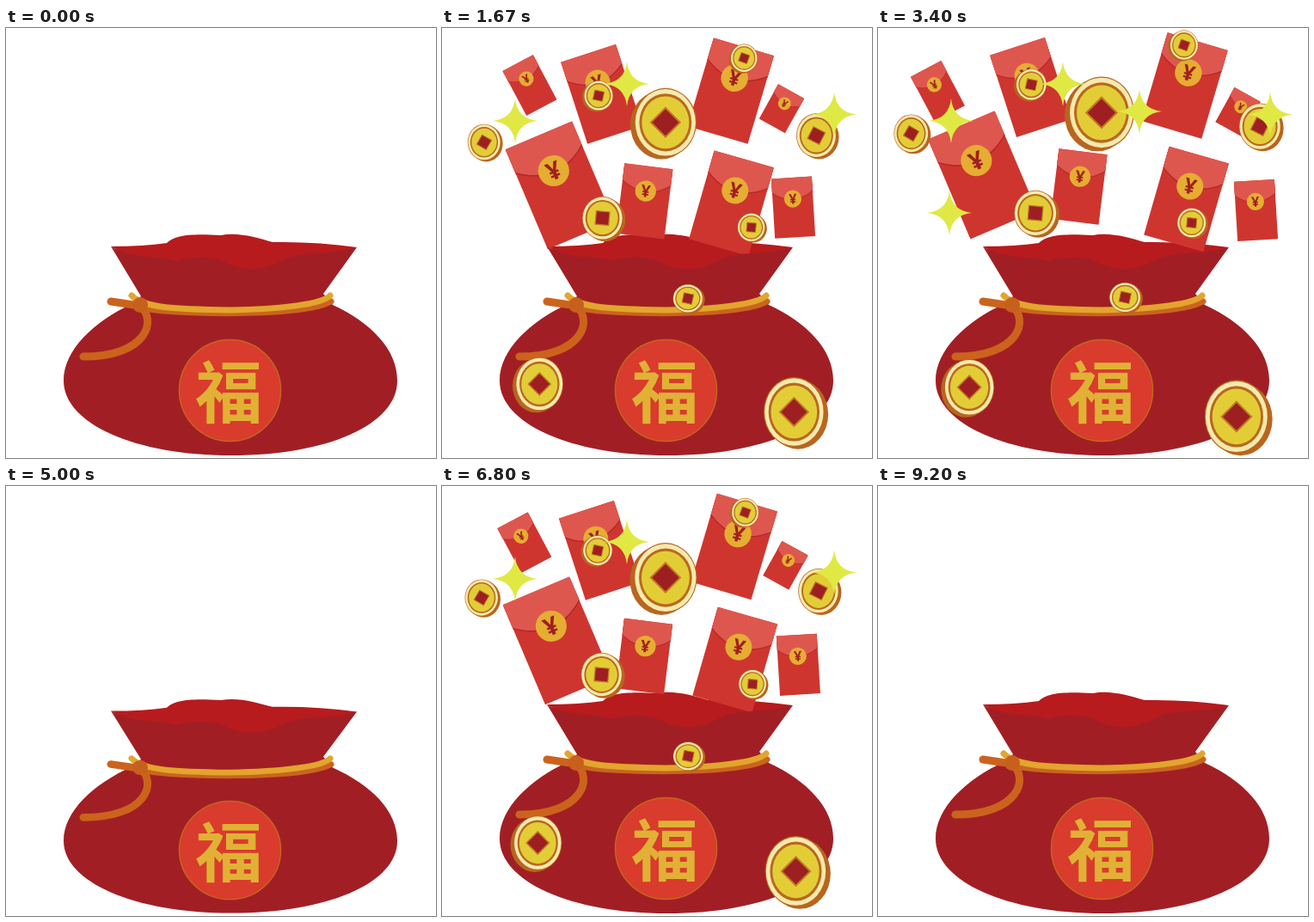
An HTML page that plays this animation: 500x500 px, repeating every 9.79 s.

```html
<!DOCTYPE html>
<html lang="zh">
<head>
<meta charset="utf-8">
<title>福袋</title>
<style>
  html, body { margin: 0; width: 100%; height: 100%; overflow: hidden; background: #fff; }
  svg { display: block; width: 100vw; height: 100vh; }
  .fu { font: 900 78px "Noto Sans CJK SC", "Noto Sans CJK JP", "Noto Sans CJK", sans-serif; }
  .yen { font-family: "Noto Sans", "Open Sans", sans-serif; font-weight: 700; }
</style>
</head>
<body>
<svg viewBox="0 0 500 500">
  <g id="back">
    <path fill="#b71b1d" d="M122 254Q160 254 187 250C197 241 212 239 250 241C270 237 292 244 310 249Q360 248 408 255L345 285H175Z"/>
  </g>
  <g id="envelopes"></g>
  <g id="front">
    <path fill="#a11f24" d="M122 254C150 271 178 263 198 271C222 263 246 266 262 276C280 283 305 281 322 270C345 258 376 265 408 255L369 309L380 322C425 343 455 374 455 410C455 462 372 497 262 497C150 497 67 460 67 410C67 374 103 341 146 321L157 312Z"/>
    <g fill="none" stroke-linecap="round">
      <path stroke="#c9651e" stroke-width="7" d="M156 325C195 334 345 336 378 318"/>
      <path stroke="#e2a52d" stroke-width="7" d="M146 311C160 326 200 327 260 328C320 327 368 321 377 311"/>
      <path stroke="#cb631d" stroke-width="9" d="M122 318L156 323C176 340 164 382 90 382"/>
    </g>
    <circle cx="156" cy="322" r="9" fill="#c8601d"/>
    <circle cx="260.500" cy="421.500" r="59" fill="#d93b2d" stroke="#c4661f" stroke-width="1.500"/>
    <text class="fu" x="259" y="453" text-anchor="middle" fill="#e1b136">福</text>
  </g>
  <g id="coins"></g>
  <g id="stars" fill="#e0e943"></g>
</svg>
<script>
const LOOP = 9790, CYCLE = LOOP / 2, STEP = 1000 / 15;
const BURST = 400, CLOSE = 3930, CLOSE_LEN = 360;
const $ = id => document.getElementById(id);

// x, y, width, height, angle, then slow and fast drift in x and in y
const envelopes = [
  [69.5, 73.5, 40, 59, -28, 52.5, 0, -49, 52.5],
  [177.5, 69, 67, 100, -18, 0, 18, 4, 12],
  [121.5, 171, 84, 126, -23, 25, 0, 4, 21],
  [233.5, 184.5, 56.5, 82, 7, 3, 0, 23, 6],
  [356.5, 67, 73, 107, 16.5, -33.5, 0, -18.5, 39.5],
  [358.5, 199, 72, 107, 16, -35.5, 0, -7, 20.5],
  [418.5, 97.5, 34.5, 46, 29, -38, 0, -43, 51],
  [439.5, 212, 47, 69.5, -3.5, -50, 0, -32, 37]
];

// x, y, half width, half height, hole angle, side of the edge
const coins = [
  [39.5, 123, 21.5, 23, 30, 1],
  [177, 66, 19, 19, 12, -1],
  [257.5, 99.5, 40.5, 43.5, 45, -1],
  [355, 20, 17.5, 18, 20, -1],
  [446, 115, 26, 28, 27, 1],
  [184.5, 216, 26.5, 27.5, 5, 1],
  [366, 227, 18, 18, 5, 1],
  [288.5, 314, 19.5, 18, 12, 1],
  [104, 419, 31, 34, 45, -1],
  [419.5, 453.5, 39.5, 44, 45, 1]
];

// x, y, first twinkle
const stars = [
  [85, 108, 1300], [215, 65, 1160], [304, 97, 2400], [83, 215, 2860], [456, 100.5, 860]
];

const squash = [[70, 1], [105, .967], [250, .86], [480, 1.15], [700, .96], [900, 1.02], [1150, 1]];

function envelopeSvg([, , w, h]) {
  const r = w * .215, y = -h * .145;
  const flap = `M${-w / 2} ${-h / 2}H${w / 2}V${-h * .27}Q0 ${-h * .01} ${-w / 2} ${-h * .27}Z`;
  return `<g><rect x="${-w / 2}" y="${-h / 2}" width="${w}" height="${h}" fill="#cf352f"/>
    <path d="${flap}" fill="#b4282b" transform="translate(0 ${h * .015})"/>
    <path d="${flap}" fill="#de574e"/>
    <circle cy="${y}" r="${r}" fill="#e5ad32"/>
    <text class="yen" y="${y + r * .57}" font-size="${r * 1.6}" text-anchor="middle" fill="#a01f20">¥</text></g>`;
}

function coinSvg([x, y, a, b, turn, side]) {
  const d = a * .06, rx = a - d, ry = b - d * .6, s = a * .62;
  const disc = (k, fill) => `<ellipse rx="${rx * k}" ry="${ry * k}" fill="${fill}"/>`;
  return `<g transform="translate(${x} ${y})">
    <ellipse cx="${side * d}" cy="${d * .6}" rx="${rx}" ry="${ry}" fill="#b9651f"/>
    <g transform="translate(${-side * d} ${-d * .6})">
    ${disc(1, "#b9651f")}${disc(.97, "#f5eaad")}${disc(.84, "#b9681f")}${disc(.76, "#e3cd37")}
    <rect x="${-s / 2}" y="${-s / 2}" width="${s}" height="${s}" transform="rotate(${turn})"
      fill="#9e1f21" stroke="#c07a22" stroke-width="${a * .05}"/></g></g>`;
}

$("envelopes").innerHTML = envelopes.map(envelopeSvg).join("");
$("coins").innerHTML = coins.map(coinSvg).join("");
$("stars").innerHTML = stars.map(() =>
  '<path d="M0-26Q2.500-2.500 26 0Q2.500 2.500 0 26Q-2.500 2.500-26 0Q-2.500-2.500 0-26Z"/>').join("");

const clamp = v => Math.max(0, Math.min(1, v));
const decay = (t, k) => Math.exp(-k * t);
// 1 at 1035 ms, 0 at 3400 ms
const drift = (t, k) => (decay(t - 1035, k) - decay(2365, k)) / (1 - decay(2365, k));

function keyed(keys, t) {
  if (t <= keys[0][0]) return keys[0][1];
  for (let i = 1; i < keys.length; i++) {
    const [t0, v0] = keys[i - 1], [t1, v1] = keys[i];
    if (t < t1) return v0 + (v1 - v0) * (1 - Math.cos(Math.PI * (t - t0) / (t1 - t0))) / 2;
  }
  return keys[keys.length - 1][1];
}

function twinkle(t, start) {
  if (t < start) return 0;
  const p = (t - start) % 1600;
  return Math.min(clamp(p / 240), clamp((1300 - p) / 240), clamp((4040 - t) / 200));
}

function draw(t) {
  const bag = `translate(0 485) scale(1 ${keyed(squash, t)}) translate(0 -485)`;
  $("back").setAttribute("transform", bag);
  $("front").setAttribute("transform", bag);

  const age = Math.max(0, t - BURST);
  const open = 1 - clamp((t - CLOSE) / CLOSE_LEN) ** 3;
  const fling = (1 - decay(age, .009)) * open;
  const slow = drift(t, .00046), fast = drift(t, .00115);
  const show = fling > 0 ? "inline" : "none";

  $("envelopes").style.display = show;
  envelopes.forEach(([x, y, , , turn, ax, bx, ay, by], i) => {
    const px = 260 + (x + ax * slow + bx * fast - 260) * fling;
    const py = 300 + (y + ay * slow + by * fast - 300) * fling;
    $("envelopes").children[i].setAttribute("transform",
      `translate(${px} ${py}) rotate(${turn}) scale(${fling})`);
  });

  const grow = 1.005 * (1 - .246 * decay(age, .0012) - .754 * decay(age, .009)) * open;
  $("coins").style.display = show;
  $("coins").setAttribute("transform", `translate(258 338) scale(${grow}) translate(-258 -338)`);

  stars.forEach(([x, y, start], i) => {
    const k = twinkle(t, start), el = $("stars").children[i];
    el.style.display = k > 0 ? "inline" : "none";
    el.setAttribute("transform", `translate(${x} ${y}) scale(${k})`);
  });
}

const begin = performance.now();
function tick() {
  const t = (performance.now() - begin) % LOOP;
  draw(Math.floor((t + 4) / STEP) * STEP % CYCLE);
  requestAnimationFrame(tick);
}
tick();
</script>
</body>
</html>
```
